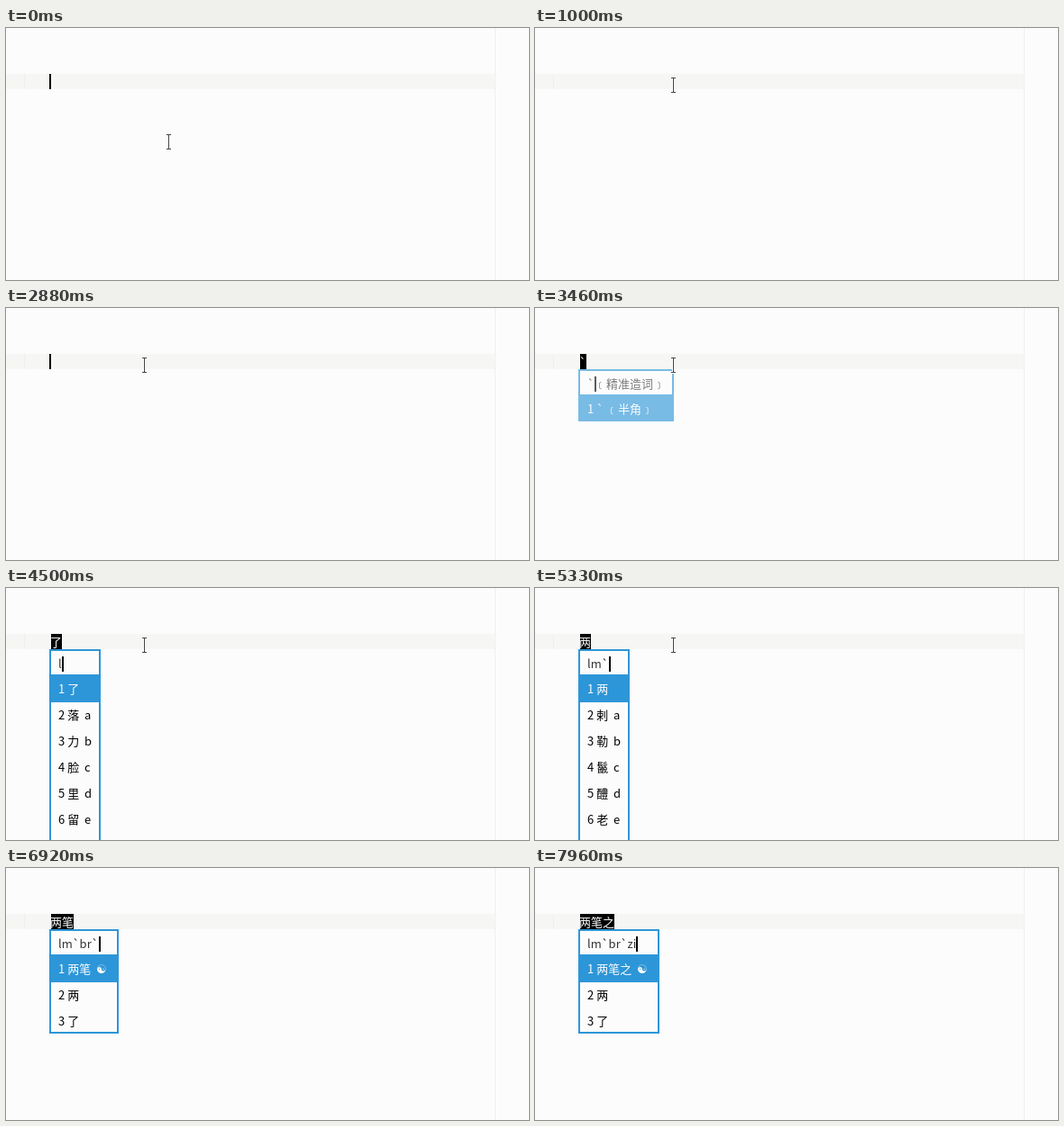
These frames come from a looping animation (580 px wide and 280 px high, 8 s). An HTML page:

```html
<!DOCTYPE html>
<html lang="zh-CN">
<head>
<meta charset="utf-8">
<title>Input method</title>
<style>
html, body { margin: 0; width: 100%; height: 100%; overflow: hidden; background: #fcfcfc; }
body { position: relative; font: 13px/29px "Noto Sans CJK SC", "Noto Sans CJK", "Noto Sans CJK JP", sans-serif; }
div { position: absolute; box-sizing: border-box; white-space: pre; }
#line { left: 0; top: 51px; width: 543px; height: 17px; background: #f6f6f4; }
#gutter { left: 20px; top: 51px; width: 1px; height: 17px; background: #eeeeec; }
#margin { left: 542px; top: 0; width: 1px; height: 280px; background: #f0f0f0; }
#caret { left: 48px; top: 51px; width: 2px; height: 17px; background: #000; }
#inline { left: 50px; top: 51px; height: 17px; line-height: 17px; text-indent: -1px; background: #000; color: #fcfcfc; overflow: hidden; }
#popup { left: 48px; top: 68px; border: 2px solid #2d96d8; background: #fcfcfc; overflow: hidden; }
#popup div { left: 0; width: 100%; height: 29px; padding-left: 8px; }
#code { top: -1px; color: #333; }
#code i { display: inline-block; width: 2px; height: 17px; margin-right: -2px; background: #000; vertical-align: -4px; }
#popup .chosen { background: #2d96d8; color: #fcfcfc; height: 31px; line-height: 31px; }
#popup b { font: 13px/1 "DejaVu Sans", sans-serif; }
#pointer { position: absolute; left: 0; top: 0; fill: none; stroke: #444; shape-rendering: crispEdges; }
#pointer .halo { stroke: #fff; stroke-width: 3; }
</style>
</head>
<body>
<div id="line"></div>
<div id="gutter"></div>
<div id="margin"></div>
<div id="caret"></div>
<div id="inline"></div>
<div id="popup"></div>
<svg id="pointer" width="7" height="17" overflow="visible">
  <path class="halo" d="M1 .5H6M3.5 0V17M1 16.5H6"/>
  <path d="M1 .5H6M3.5 0V17M1 16.5H6"/>
</svg>
<script>
const LOOP = 8000, OPEN = 3385, FADE = 120, BLINK = 600;
const MOVE_START = 150, MOVE_END = 930, POINTER_HIDE = 6200;
const $ = id => document.getElementById(id);
const clamp = v => Math.min(1, Math.max(0, v));

const lettered = chars => [...chars].map((c, i) => i ? `${c}  ${"abcdefg"[i - 1]}` : c);
const phrase = word => [`${word}  <b>☯</b>`, "两", "了"];
const forL = lettered("了落力脸里留老"), forLm = lettered("两剌勒鬣醴老来");

// Each key press: time, typed code, text in the editor, popup width, candidates, hint
const steps = [
  [OPEN, "`", "`", 106, ["` ﹝半角﹞"], "﹝精准造词﹞"],
  [4380, "l", "了", 57, forL],
  [4800, "lm", "两", 57, forLm],
  [5200, "lm`", "两", 57, forLm],
  [5840, "lm`b", "两不", 77, phrase("两不")],
  [6200, "lm`br", "两笔", 77, phrase("两笔")],
  [6600, "lm`br`", "两笔", 77, phrase("两笔")],
  [7280, "lm`br`z", "两笔之", 90, phrase("两笔之")],
  [7700, "lm`br`zi", "两笔之", 90, phrase("两笔之")]
];

let shown;
function showStep(step) {
  if (step === shown) return;
  shown = step;
  $("popup").hidden = $("inline").hidden = !step;
  if (!step) return;
  const [, code, text, width, candidates, hint = ""] = step;
  const rows = candidates.map((c, i) =>
    `<div class="${i ? "" : "chosen"}" style="top:${i ? 29 * i + 27 : 26}px">${i + 1} ${c}</div>`);
  $("popup").innerHTML = `<div id="code">${code}<i></i>${hint}</div>${rows.join("")}`;
  $("popup").style.width = width + "px";
  $("popup").style.height = 29 * (rows.length + 1) + "px";
  $("inline").textContent = text;
  $("inline").style.width = (text === "`" ? 7 : 13 * text.length - 1) + "px";
}

const start = performance.now();
function draw() {
  const t = (performance.now() - start) % LOOP;
  showStep(steps.findLast(step => step[0] <= t));
  $("popup").style.opacity = clamp((t - OPEN) / FADE);
  $("caret").hidden = t >= OPEN || t % (2 * BLINK) >= BLINK;

  const p = clamp((t - MOVE_START) / (MOVE_END - MOVE_START));
  const eased = p * p * (3 - 2 * p);
  const x = Math.round(177 - 27 * eased), y = Math.round(118 - 63 * eased);
  $("pointer").style.transform = `translate(${x}px, ${y}px)`;
  $("pointer").style.visibility = t < POINTER_HIDE ? "visible" : "hidden";
  requestAnimationFrame(draw);
}
draw();
</script>
</body>
</html>
```
